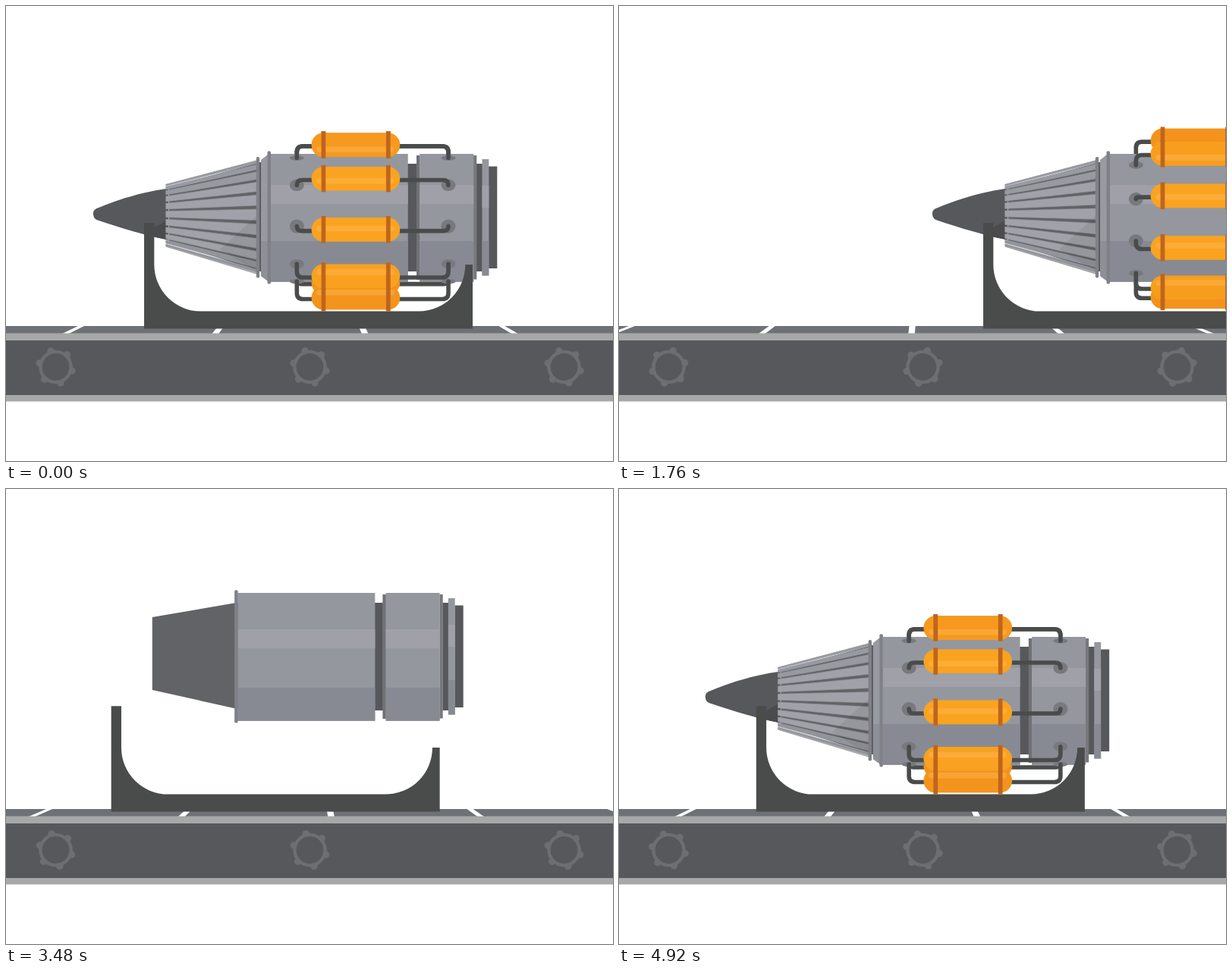
These frames come from a looping animation (800x600 px, 4960 ms). An HTML page:

```html
<!DOCTYPE html>
<html lang="en">
<head>
<meta charset="utf-8">
<title>Engine line</title>
<style>
  html, body { margin: 0; width: 100%; height: 100%; overflow: hidden; background: #fff; }
  svg { display: block; width: 100vw; height: 100vh; }
</style>
</head>
<body>
<svg id="stage" viewBox="0 0 800 600"></svg>
<script>
const stage = document.getElementById('stage');
const LOOP = 4960, SEG = 191.5, SPACING = SEG * 5, DRIFT = 0.0293;
const INK = '#4a4b4b', DARK = '#57585c', STEEL = '#95979f', LIGHT = '#a0a0a9',
      SHADE = '#888a93', RIM = '#7f8187', RAIL = '#a7a8a8';

const clamp = v => Math.max(0, Math.min(1, v));
const span = (t, a, b) => clamp((t - a) / (b - a));
const inOut = u => u < 0.5 ? 4 * u ** 3 : 1 - 4 * (1 - u) ** 3;
const ease = (t, a, b) => inOut(span(t, a, b));
const sin = d => Math.sin(d * Math.PI / 180);
const cos = d => Math.cos(d * Math.PI / 180);
const turn = d => sin(d) - 0.02 * sin(2 * d);
const mix = (a, b, u) => 'rgb(' + a.map((v, i) => Math.round(v + (b[i] - v) * u)) + ')';

const rect = (x, y, w, h, fill, more = '') =>
  `<rect x="${x}" y="${y}" width="${w}" height="${h}" fill="${fill}" ${more}/>`;
const box = (x0, y0, x1, y1, fill, more) => rect(x0, y0, x1 - x0, y1 - y0, fill, more);
const path = (d, fill, more = '') => `<path d="${d}" fill="${fill}" ${more}/>`;
const poly = (pts, fill, more = '') => `<polygon points="${pts}" fill="${fill}" ${more}/>`;
const move = (x, y, body) => `<g transform="translate(${x} ${y})">${body}</g>`;
const rod = (x0, x1, y, w, color, more = '') =>
  `<path d="M${x0} ${y}H${x1}" stroke="${color}" stroke-width="${w}" stroke-linecap="round" ${more}/>`;

// Stand position; the quick transfer happens once per loop.
const standX = t => 182 + DRIFT * (t - LOOP) +
  (SPACING - DRIFT * LOOP) * ease(t, LOOP + 1380, LOOP + 2280);

const spin = t => 8 + 0.00806 * (t - LOOP) - 8 * (Math.max(0, LOOP - t) / 560) ** 2.5;

function wheel(x, angle) {
  let s = `<circle cx="${x}" cy="476" r="20" fill="none" stroke="#6d6e72" stroke-width="4.6"/>`;
  for (let i = 0; i < 6; i++) {
    const a = angle + i * 60;
    s += `<circle cx="${x + 22 * cos(a)}" cy="${476 + 22 * sin(a)}" r="4.7" fill="#6d6e72"/>`;
  }
  return s + `<circle cx="${x}" cy="476" r="17.8" fill="#57585b"/>`;
}

function conveyor(x) {
  let s = rect(0, 422, 800, 10, '#6e7175');
  const first = x + 289 - 400;
  const shift = ((first % SEG) + SEG) % SEG;
  for (let i = -3; i <= 3; i++) {
    const m = shift + i * SEG, near = v => 400 + v * 1.03, far = v => 400 + v * 0.965;
    s += poly([near(m - 4.2), 432, far(m - 4.2), 422, far(m + 4.2), 422, near(m + 4.2), 432], '#fff');
  }
  s += rect(0, 431.5, 800, 90, RAIL) + rect(0, 441, 800, 72, '#57585b');
  const angle = 13 + (x - 182) * 1260 / SPACING;
  for (const wx of [65.5, 400.5, 735.5]) s += wheel(wx, angle);
  return s;
}

const stand = x => move(x, 0,
  path('M0 286.3H13.3V341A61.5 61.5 0 0 0 74.8 402.6H362A61.5 61.5 0 0 0 423.3 341H433V425.5H0Z', INK));

function shell(x0, x1, t) {
  const k = 1 - ease(t, 3750, 4150), o = ease(t, 2980, 3250);
  return box(x0, 195, x1, 363.7, STEEL) +
    `<g opacity="${o}">` +
    box(x0, 236 + 7 * k, x1, 261 + 7 * k, LIGHT) +
    box(x0, 310 + 10 * k, x1, 363.7, SHADE) + '</g>';
}

function rear(t) {
  return box(636, 211.5, 647.3, 346, DARK) +
    box(620, 208, 628, 350, DARK) +
    box(627.5, 202, 636.3, 355.5, STEEL) + box(627.5, 237, 636.3, 266, LIGHT) +
    box(627.5, 310, 636.3, 355.5, SHADE) +
    box(616, 197, 620.3, 360.5, '#77787c') +
    box(529, 208, 541.5, 350, DARK) +
    box(541, 197, 545.5, 361, '#707176') +
    shell(545.2, 616.2, t);
}

function nose(t) {
  const slide = 96 * (1 - ease(t, 3650, 4140));
  return move(slide, 0,
    path('M115 275C114.5 269 118 267.5 122 266C151 253.5 185 244.5 214 240.5V308.5C185 303 151 292.5 121 282.5Q115.5 281 115 275Z', DARK) +
    path('M181 301L214 281V308.5Q196 305 181 301Z', '#4b4b4d'));
}

function fins(t) {
  const grow = ease(t, 3500, 4100), fold = ease(t, 3750, 4150);
  const left = 331 - 120.3 * grow, rl = 75 - 34 * fold;
  const cl = 278.5 - 2.2 * fold, ri = 48 - 12 * fold;
  let s = poly([214.5, 275 - ri, 331, 278 - 71, 331, 278 + 71, 214.5, 275 + ri], '#626367');
  if (grow <= 0) return s;
  const turnBy = spin(t) - 3;
  for (let i = 0; i < 24; i++) {
    const a = turnBy + i * 15, b = a + 2, e = a + 13;
    const facing = cos(a + 7.5);
    if (facing < -0.06) continue;
    const tone = sin(a + 7.5);
    const fill = tone > 0.72 ? '#92949b' : tone < -0.72 ? '#989aa1' : '#a1a1a9';
    s += poly([left, cl + rl * sin(b), 331, 278.5 + 75 * sin(b),
               331, 278.5 + 75 * sin(e), left, cl + rl * sin(e)], fill,
              'stroke="#989aa0" stroke-width=".7"');
  }
  return s + `<g opacity="${0.07 * fold}">` + poly([282, 321, 331, 276, 331, 350], '#000') + '</g>';
}

const collar = () =>
  box(333, 206, 337, 350, DARK) +
  poly([336, 203, 345.5, 195.5, 345.5, 363, 336, 356], '#989aa1') +
  poly([336, 310, 345.5, 310, 345.5, 363, 336, 356], '#8e9097') +
  box(329.8, 199, 334.2, 358.5, RIM, 'rx="2"');

function tank(i, t) {
  const age = t - 3749 - i * 50;
  if (age <= 0) return null;
  const a = spin(t) + 80 - 40 * i, depth = cos(a);
  const y = 281 + 104 * turn(a), wy = 279.3 + 84 * turn(a), py = y + 1.7;
  let s = '';
  const well = ease(age, 470, 690);
  if (depth > -0.05 && well > 0) {
    for (const x of [383.3, 583]) {
      s += `<ellipse cx="${x}" cy="${wy}" rx="${9.5 * well}" ry="${Math.max(3.2, 9.2 * depth) * well}" fill="#77797f"/>`;
    }
  }
  const run = ease(age, 60, 195);
  if (run > 0) {
    const r = Math.min(8, Math.abs(py - wy)), v = py - Math.sign(py - wy) * r;
    s += path(`M383.3 ${wy}V${v}Q383.3 ${py} ${383.3 + r} ${py}H${583 - r}Q583 ${py} 583 ${v}V${wy}`, 'none',
      `pathLength="1" stroke="${INK}" stroke-width="5.6" stroke-linecap="round" ` +
      `stroke-dasharray="${run} 2" stroke-dashoffset="${-(1 - run) / 2}"`);
  }
  const thick = 31.6 * (1 - (1 - span(age, 0, 300)) ** 3);
  const fill = mix([243, 147, 28], [250, 163, 32], clamp(depth * 1.3));
  s += rod(418.4, 503.4, y, thick, fill);
  const glow = span(age, 300, 500);
  if (glow > 0) s += rod(413, 508, y - 0.5 - 6.5 * sin(a), 7.6, '#ffbb58', `opacity="${0.42 * glow}"`);
  if (age > 150) {
    const w = 0.7 + 5 * span(age, 160, 560) ** 3;
    for (const x of [418.4, 503.8]) s += rect(x - w / 2, y - 18, w, 35.6, '#bf651c');
  }
  return { depth, s };
}

function engine(x, t) {
  const drop = -58 * (1 - ease(t, 4260, 4560));
  const tanks = [];
  for (let i = 0; i < 9; i++) {
    const item = tank(i, t);
    if (item) tanks.push(item);
  }
  tanks.sort((p, q) => p.depth - q.depth);
  const layer = front => tanks.filter(p => (p.depth >= 0) === front).map(p => p.s).join('');

  let s = layer(false);
  if (t > 3050) {
    s += move(-120 * (1 - ease(t, 3050, 3550)), 0, rear(t));
    s += move(140 * (1 - ease(t, 3150, 3650)), 0,
      (t > 3650 ? nose(t) : '') + fins(t) + collar());
  }
  const w = ease(t, 2760, 3100);
  s += `<g transform="translate(${439.2 * (1 - w)} 0) scale(${w} 1)">` + shell(348.7, 529.7, t) + '</g>';
  if (t > 3150) {
    s += `<g opacity="${span(t, 3150, 3300)}">` + box(344.5, 191.3, 349, 366.5, RIM, 'rx="2"') + '</g>';
  }
  return move(x - 182, drop, s + layer(true));
}

function draw(ms) {
  const now = ms % LOOP;
  // A build begins mid-loop and its finished piece leaves in the next one.
  const t = now < 2500 ? now + LOOP : now;
  const x = standX(t);
  let s = conveyor(x);
  if (t > 2760) s += engine(x, t);
  stage.innerHTML = s + stand(x) + stand(x - SPACING);
}

const start = performance.now();
function tick() {
  draw(performance.now() - start);
  requestAnimationFrame(tick);
}
tick();
</script>
</body>
</html>
```
